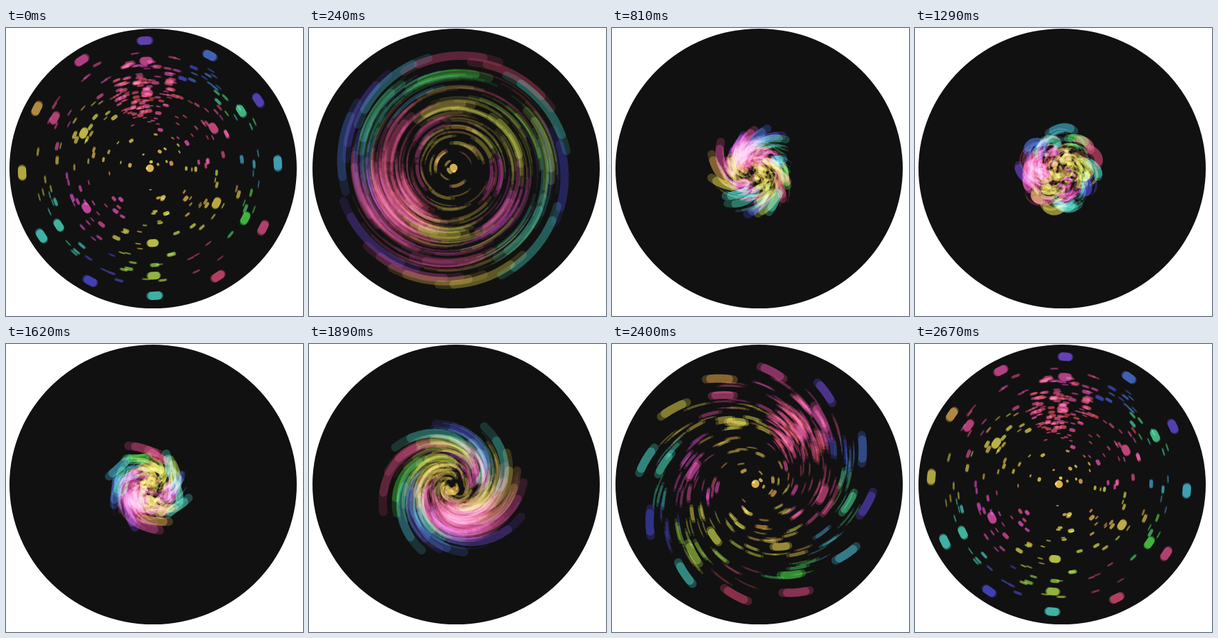
Recreate the animation shown at these times as an HTML page with a canvas. Size 427 px wide and 415 px high, loop 2700 ms.

```html
<!DOCTYPE html>
<html lang="en">
<head>
<meta charset="utf-8">
<title>Particle swirl</title>
<style>
  html, body { margin: 0; width: 100%; height: 100%; overflow: hidden; background: #fff; }
  canvas { display: block; }
</style>
</head>
<body>
<canvas width="427" height="415"></canvas>
<script>
const ctx = document.querySelector('canvas').getContext('2d');
const LOOP = 2700, CX = 207, CY = 202, TAU = Math.PI * 2, SAMPLES = 12;

// Total turn in radians at a few times
const SPIN = [[0, 0], [150, .6], [450, 4.3], [700, 6.2], [1900, 9], [2250, 11.2], [LOOP, 2 * TAU]];

// Rings of large dots, clockwise from the top
const RINGS = [
  { radius: 184, size: 6, hues: [256, 224, 248, 192, 338, 345, 172, 240, 174, 54, 36, 328] },
  { radius: 155, size: 5.5, hues: [330, 150, 120, 80, 165, 335] },
  { radius: 108, size: 5.5, hues: [345, 338, 48, 65, 325, 54] },
  { radius: 0, size: 5.5, hues: [38] }
];

let seed = 11;
const random = () => (seed = seed * 16807 % 2147483647) / 2147483647;

function makeDot(x, y, hue, size) {
  return {
    x, y, hue, size,
    angle: Math.atan2(y - CY, x - CX),
    radius: Math.hypot(x - CX, y - CY),
    delay: (random() - .5) * 120,
    phase: random() * TAU,
    turns: 2 + Math.floor(random() * 3),
    wobble: 4 + random() * 16
  };
}

const bigDots = RINGS.flatMap(({ radius, size, hues }) => hues.map((hue, i) => {
  const a = i / hues.length * TAU - TAU / 4;
  return makeDot(CX + radius * Math.cos(a), CY + radius * Math.sin(a), hue, size);
}));

// Small dots take the hue of the nearest large one
function cloud(cx, cy, radius, count) {
  return Array.from({ length: count }, () => {
    const a = random() * TAU, r = radius * Math.sqrt(random());
    const x = cx + r * Math.cos(a), y = cy + r * Math.sin(a);
    const distance = d => Math.hypot(d.x - x, d.y - y);
    const nearest = bigDots.reduce((a, b) => distance(b) < distance(a) ? b : a);
    return makeDot(x, y, nearest.hue + (random() - .5) * 36, 1 + 1.8 * random() ** 2);
  });
}

const dots = [...cloud(CX, CY, 168, 230), ...cloud(CX, 88, 46, 100), ...bigDots];

// Cubic Hermite curve through [time, value] keys
function curve(keys, t) {
  const last = keys.length - 1;
  let i = 0;
  while (i < last - 1 && t > keys[i + 1][0]) i++;
  const slope = k => {
    const a = keys[Math.max(k - 1, 0)], b = keys[Math.min(k + 1, last)];
    return (b[1] - a[1]) / (b[0] - a[0]);
  };
  const [t0, v0] = keys[i], [t1, v1] = keys[i + 1];
  const span = t1 - t0, u = Math.min(1, Math.max(0, (t - t0) / span)), w = 1 - u;
  return w * w * (1 + 2 * u) * v0 + u * u * (3 - 2 * u) * v1
    + span * u * w * (w * slope(i) - u * slope(i + 1));
}

// Collapse towards the centre, with a small swell half way
function spreadAt(t) {
  const a = Math.PI * t / LOOP;
  return .15 + .85 * Math.abs(Math.cos(a)) ** 3 + .15 * Math.sin(a) ** 24;
}

function place(d, t) {
  const p = t / LOOP, local = t - d.delay * Math.sin(Math.PI * p);
  const spread = spreadAt(local), r = d.radius * spread;
  const a = d.angle - curve(SPIN, local);
  const wobble = d.wobble * (1 - spread), b = d.phase - d.turns * TAU * p;
  return [CX + r * Math.cos(a) + wobble * Math.cos(b),
    CY + r * Math.sin(a) + wobble * Math.sin(b) + 6 * (1 - spread)];
}

function strokePath(points) {
  ctx.beginPath();
  for (const point of points) ctx.lineTo(...point);
  ctx.stroke();
}

// A moving dot is smeared along its path and fades as the smear grows
function drawDot(d, t, shutter) {
  const path = [];
  let length = 0;
  for (let k = 0; k <= SAMPLES; k++) {
    path.push(place(d, t + shutter * k / SAMPLES));
    if (k) length += Math.hypot(path[k][0] - path[k - 1][0], path[k][1] - path[k - 1][1]);
  }
  const alpha = Math.sqrt(2 * d.size / (2 * d.size + length));
  ctx.strokeStyle = `hsl(${d.hue}, 80%, 57%)`;
  ctx.lineWidth = 2 * d.size;
  ctx.globalAlpha = alpha * .55;
  strokePath(path);
  ctx.globalAlpha = alpha * .75;
  strokePath(path.slice(2, -2));
}

function draw(now) {
  const t = now % LOOP;
  ctx.globalAlpha = 1;
  ctx.globalCompositeOperation = 'source-over';
  ctx.clearRect(0, 0, 427, 415);
  ctx.fillStyle = '#111';
  ctx.beginPath();
  ctx.ellipse(211.5, 202.5, 206.5, 201.5, 0, 0, TAU);
  ctx.fill();
  ctx.globalCompositeOperation = 'screen';
  ctx.lineCap = ctx.lineJoin = 'round';
  const shutter = 20 + 260 * Math.max(0, 1 - spreadAt(t)) ** .75;
  for (const d of dots) drawDot(d, t, shutter);
}

const start = performance.now();
function tick() {
  draw(performance.now() - start);
  requestAnimationFrame(tick);
}
tick();
</script>
</body>
</html>
```
